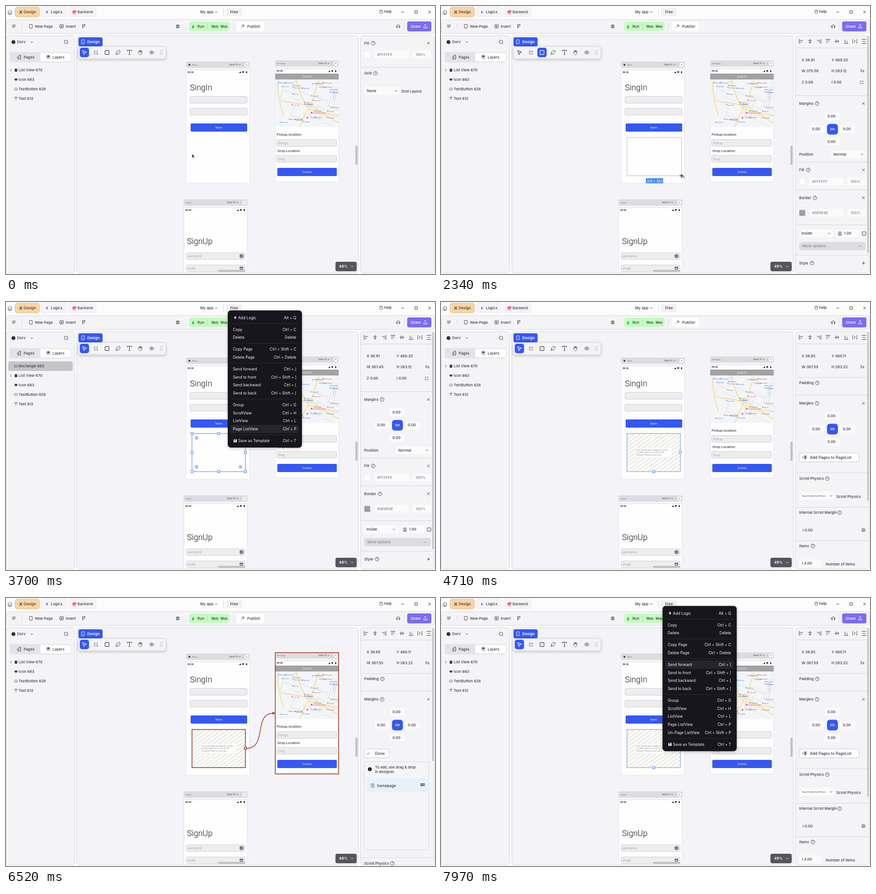
Recreate the animation shown at these times as an HTML page. Size 948 by 591 pixels, loop 8 s.

```html
<!DOCTYPE html>
<html lang="en">
<head>
<meta charset="utf-8">
<title>App builder</title>
<style>
html, body { margin: 0; width: 100%; height: 100%; overflow: hidden; background: #fcfcfd; }
svg { display: block; width: 100%; height: 100%; font: 500 8.2px Inter, sans-serif; }
</style>
</head>
<body>
<svg viewBox="0 0 948 591">
  <defs>
    <pattern id="hatch" width="9" height="7" patternUnits="userSpaceOnUse" patternTransform="rotate(-35)">
      <path d="M0 1H9" stroke="#c9c2ae" stroke-width=".9"/>
    </pattern>
    <clipPath id="map"><rect x="595" y="162" width="140" height="105"/></clipPath>
    <clipPath id="stage"><rect x="157" y="66" width="621" height="522"/></clipPath>
    <clipPath id="phone"><rect x="398" y="141" width="140" height="250"/></clipPath>
    <filter id="shadow" x="-20%" y="-20%" width="140%" height="150%">
      <feDropShadow dx="0" dy="2" stdDeviation="3" flood-opacity=".22"/>
    </filter>
  </defs>
  <g id="base"></g>
  <g id="live"></g>
</svg>
<script>
const LOOP = 8000;
const INK = '#3b3b42', GREY = '#85858c', BLUE = '#3558f4', RED = '#9b2a12', LINE = '#d6d6dd', PANEL = '#f4f4f7';
const ROBOTO = 'font-family="Roboto, sans-serif" font-weight="400"';
const LIGHT = 'font-family="Roboto, sans-serif" font-weight="300"';
const MID = 'text-anchor="middle"', END = 'text-anchor="end"';

// Drawing helpers; text is centred vertically on y
const text = (x, y, s, size = 8.2, fill = INK, more = '') =>
  `<text x="${x}" y="${y + size * .36}" font-size="${size}" fill="${fill}" ${more}>${s}</text>`;
const box = (x, y, w, h, r = 0, fill = '#fff', stroke = 'none', more = '') =>
  `<rect x="${x}" y="${y}" width="${w}" height="${h}" rx="${r}" fill="${fill}" stroke="${stroke}" ${more}/>`;
const line = (d, stroke = INK, width = 1, more = '') =>
  `<path d="${d}" fill="none" stroke="${stroke}" stroke-width="${width}" ${more}/>`;
const shape = (d, fill = INK) => `<path d="${d}" fill="${fill}"/>`;
const dot = (x, y, r, fill, stroke = 'none', more = '') =>
  `<circle cx="${x}" cy="${y}" r="${r}" fill="${fill}" stroke="${stroke}" ${more}/>`;
const at = (x, y, s) => `<g transform="translate(${x} ${y})">${s}</g>`;
const chevron = (x, y, color = INK) => line(`M${x - 2.5} ${y - 1.2}l2.5 2.5 2.5-2.5`, color);
const cross = (x, y, r = 2.7) => line(`M${x - r} ${y - r}l${2 * r} ${2 * r}m0 ${-2 * r}l${-2 * r} ${2 * r}`);
const help = (x, y) => dot(x, y, 4.2, 'none', INK, 'stroke-width=".9"') + text(x, y, '?', 6.5, INK, MID);
const bolt = (x, y, fill) => at(x, y, shape('M1-4.5L-3 .7H-.3L-1 4.5 3-1H.3Z', fill));

function random(seed) {
  return () => (seed = (seed * 16807) % 2147483647) / 2147483647;
}

function topBars() {
  const tab = (x, w, label, tx, fill = PANEL, edge = '#ededf1') => box(x, 2.5, w, 21.5, 5, fill, edge) + text(tx, 13.5, label);
  return line('M4 13.5L8.5 9l4.5 4.5M5 12.5V18h7v-5.5M8.5 18v-3.5') +
    tab(20, 54, 'Design', 39, '#f8d5a2', '#e5bd84') + line('M29.5 10.5l6 6m0-6l-6 6', '#5c4526', 1.6) +
    tab(78, 56, 'Logics', 99) + bolt(90.5, 13.5, '#7857f5') +
    tab(138, 61, 'Backend', 158) + dot(149, 13, 2.6, '#f05d9a') + dot(152.5, 12, 3, '#f05d9a') + line('M148 17h6', '#e05292', 1.5) +
    text(429, 13.5, 'My app') + chevron(464.5, 13.5) + line('M480.5 6v16', LINE) +
    box(486, 5, 35, 17, 4, '#f1f1f4') + text(504, 13.5, 'Free', 8.2, INK, MID) +
    dot(829, 12.5, 3.6, 'none', INK, 'stroke-width=".9"') + text(829, 12.5, '?', 5.5, INK, MID) + text(835.5, 12.5, 'help') +
    line('M873.5 13.5h6M903.5 10.5h5.5v5.5h-5.5z') + cross(936, 13.5) +
    box(.5, 30, 947, 30.5, 6, PANEL, LINE) +
    line('M13.5 42h8M13.5 44.5h8M13.5 47h6', INK, .9) + line('M35.5 38v14', LINE) +
    box(52, 40.5, 6, 8.5, 1, 'none', INK) + text(64, 45, 'New Page') +
    box(119, 41, 7.5, 7.5, 1, 'none', INK) + line('M120.5 44.8h4.5M122.8 42.5v4.5') + text(132, 45, 'Insert') +
    line('M169.5 40.5h5v3h-5zM169.5 43.5v5.5M169.5 46.5h3.5') +
    dot(379.5, 45, 3, 'none', INK) + line('M375.5 42h8M375.5 45h8M375.5 48h8M379.5 41v8', INK, .7) +
    box(405, 35, 89, 20, 5, '#c3fbc0') + '<ellipse cx="413.5" cy="46" rx="2" ry="3.5" fill="#32bd52"/>' +
    text(423, 45, 'Run') + line('M445.5 38v14', '#a1d7a0', .8) + text(454, 45, 'Web', 7, INK, 'font-weight="600"') + text(474, 45, 'Web', 7, INK, 'font-weight="600"') +
    line('M502.5 37v16', LINE) + box(510, 35, 60, 20, 4, '#fff') + line('M520 47.5l5-5M521 42h4.5v4.5') + text(533, 45, 'Publish') +
    line('M863 46a3.8 3.8 0 1 1 7.5 0M863 45v2.5h2V45zM870.5 45v2.5h-2V45z') + line('M880 37v16', LINE) +
    box(886.5, 34, 53.5, 22, 4, '#7b6bf6') + text(894, 45, 'Share', 8.2, '#fff') + line('M923 45v3.5h7V45M926.5 47v-7M924.5 42l2-2 2 2', '#fff');
}

function statusBar(x, y, time) {
  return text(x + 3, y, time, 4.6, '#222', 'font-weight="700"') +
    shape(`M${x + 117} ${y + 2}h4v-4z`, '#111') + shape(`M${x + 123.5} ${y - 1}q2.5-2 5 0l-2.5 3z`, '#111') + box(x + 132.5, y - 2, 2.2, 4.2, .4, '#111');
}

function page(x, barY, name, pageH, time) {
  const top = barY + 18;
  return box(x, barY, 140, 12.5, 2, '#dddde1', '#cfcfd5', 'stroke-width=".6"') +
    text(name === 'SignIn' ? x + 13 : x + 4, barY + 6.2, name, 4, '#666', ROBOTO) +
    (name === 'SignIn' ? shape(`M${x + 5} ${barY + 6.5}l2.3-2.3 2.3 2.3h-.8v2h-3v-2z`, '#222') : '') +
    text(x + 95, barY + 6.2, 'Vantel 14', 4.2, '#555') + chevron(x + 118, barY + 6.2, '#666') +
    text(x + 125.5, barY + 6, '⋮', 6, '#444', MID) + box(x + 130, barY + 2.5, 8, 8, 1, '#f7f7f9') + text(x + 134, barY + 6, '+', 5, '#333', MID) +
    box(x, top, 140, pageH, 1, '#fefefe', '#dedee3', 'stroke-width=".8"') + statusBar(x, top + 5, time);
}

const field = (x, y, w, label = '') => box(x, y, w, 15, 2.5, '#ededf0', '#c5c5ca', 'stroke-width=".8"') + text(x + 3.5, y + 7.5, label, 7, '#85858a', LIGHT);
const button = (x, y, w, label) => box(x, y, w, 18, 2, BLUE) + text(x + w / 2, y + 9, label, 5, '#fff', MID + ' ' + ROBOTO);

function map() {
  const next = random(71);
  let streets = '', pins = '';
  for (let i = 0; i < 34; i++) {
    const x = 595 + next() * 140, y = 162 + next() * 105, turn = next() < .5;
    streets += turn ? `M${x} ${y}l26 ${7 + next() * 5}` : `M${x} ${y}l${5 + next() * 6} -26`;
  }
  const labels = ['Park hall', 'Corner cafe', 'Old market', 'City garden', 'Town museum', 'Book house'];
  for (let i = 0; i < 30; i++) {
    const x = 601 + next() * 122, y = 167 + next() * 95, tone = i % 9 === 4 ? '#e5385b' : i % 4 ? '#4478dc' : '#77808e';
    pins += dot(x, y, 1.1, tone) + text(x + 2, y + 1, labels[i % 6], 2.8, tone, ROBOTO);
  }
  const roads = 'M600 167C601 190 603 205 606 216L613 242M607 209L650 216 676 222 735 258M640 163L655 205 668 228M692 163L676 212 655 250 650 267M668 228L735 243';
  return box(595, 162, 140, 105, 0, '#f4f5f7') + '<g clip-path="url(#map)">' +
    line(streets, '#dde1e7', 1.2) +
    line(roads, '#f0d98d', 2.4, 'stroke-linejoin="round"') + line(roads, '#fae9ae', 1.4, 'stroke-linejoin="round"') + pins +
    text(624, 249.5, 'Central crossing hall', 3.5, '#e13a52', ROBOTO) + dot(666, 246.5, 1.8, '#e13a52') +
    text(679, 236, 'North gate garden', 3.5, '#e13a52', ROBOTO) + dot(675.5, 235.5, 1.8, '#e13a52') + '</g>';
}

function workspace() {
  return box(156.5, 65.5, 622, 523, 6, '#f4f4f8', LINE) + '<g clip-path="url(#stage)">' +
    page(398, 123, 'SignIn', 250, '09:36') + text(406.5, 180, 'SingIn', 18, '#151515', LIGHT) +
    field(406.5, 199.5, 126.5) + field(406.5, 225.5, 126.5) + button(408, 259, 125, 'Button') +
    page(595, 120.5, 'homepage', 249.5, '09:36') + box(595, 149, 140, 13, 0, '#a2a2a3') + text(665, 155.5, 'Search', 7, '#fff', MID + ' ' + LIGHT) + map() +
    text(598, 283.5, 'Pickup location', 8, '#222', ROBOTO) + field(598, 294.5, 132.5, 'Pickup') +
    text(600, 319.5, 'Drop Location', 8, '#222', ROBOTO) + field(598, 329.5, 132.5, 'Drop') + button(599.5, 357, 131.5, 'Continue') +
    page(393, 427, 'signup', 160, '09:36') + text(400, 518.5, 'SignUp', 18, '#151515', LIGHT) +
    field(398, 544, 130, 'username') + dot(520.5, 551.5, 3.5, 'none', '#222', 'stroke-width="1.2"') + line('M517.5 550l6 3M519 554l2-5', '#222') +
    field(398, 571, 130, 'email') + box(517, 575.5, 6.5, 5, .7, 'none', '#222') + line('M517 576l3.2 2.3 3.3-2.3', '#222') + '</g>' +
    box(469, 582, 60, 4.5, 1, '#c0c0c5') + box(772, 308, 5, 42, 2, '#c2c2c8') +
    box(728, 564, 47, 21, 4, '#55565b') + text(736, 574.5, '49%', 8.2, '#fff', 'font-weight="600"') + chevron(765, 574.5, '#fff') +
    box(160, 69, 53.5, 20, 4, BLUE) + box(167, 74.5, 6, 8.5, 1, 'none', '#fff') + text(179.5, 79, 'Design', 8.2, '#fff', 'font-weight="600"') +
    box(160, 89.5, 193, 26.5, 5, '#f4f4f7', '#d9d9df', 'filter="url(#shadow)"');
}

function leftPanel() {
  return box(.5, 65.5, 151, 523, 6, PANEL, LINE) + dot(16.5, 79.5, 4.3, '#333338') + text(24.5, 79.5, 'Dorv') + chevron(57, 79.5) +
    dot(132.5, 79, 3.8, 'none', INK) + line('M135.3 81.8l2 2') +
    box(8, 101.5, 136, 23, 5, '#e4e4e8') + box(76, 103.5, 67, 19, 4, '#fff') +
    line('M27 108.5h5.5v8.5H26v-4M24.5 112.5h5M28 111l1.5 1.5-1.5 1.5') + text(39, 113, 'Pages') +
    shape('M93.5 108.5l4.5 2.3-4.5 2.3-4.5-2.3z') + line('M89 113.5l4.5 2.3 4.5-2.3') + text(103, 113, 'Layers');
}

function layers(withRectangle) {
  const shift = withRectangle ? 20.9 : 0, y = i => 141.5 + shift + i * 20.9;
  const outline = yy => box(19, yy - 2.2, 6, 4.4, .8, 'none', INK, 'stroke-width=".8"');
  return (withRectangle ? box(5, 131, 142.5, 21, 4, '#c4c4c9') + outline(141.5) + text(28, 141.5, 'Rectangle 682') : '') +
    line(`M9.5 ${y(0) - 2.5}l2.5 2.5-2.5 2.5`) + box(19.5, y(0) - 3.5, 5, 7, 1, INK) + line(`M18.5 ${y(0) - 1}h7m0 2.5h-7`, INK, .7) + text(28, y(0), 'List View 670') +
    shape(`M22 ${y(1) + 3.2}l-3-3c-1.5-3 2-4 3-1.7 1-2.3 4.5-1.3 3 1.7z`) + text(28, y(1), 'Icon 663') +
    outline(y(2)) + text(28, y(2), 'TextButton 628') + line(`M19 ${y(3) - 1.5}v-1.5h6v1.5M22 ${y(3) - 3}v6`, INK, .9) + text(28, y(3), 'Text 612');
}

function tools(active) {
  const x = active === 'rect' ? 213 : 163, tint = name => active === name ? '#fff' : INK;
  return box(x, 92, 20.5, 21, 5, BLUE) +
    line('M169.5 98.5l3 8.5 1.5-3.8 3.8-1.5z', tint('select'), 1.1) +
    line('M196 98v9.5M201.5 98v9.5M194 100h9.5M194 105.5h9.5', GREY, .9) +
    box(218.8, 98.3, 8.8, 8.5, 1, 'none', tint('rect'), 'stroke-width="1.2"') +
    line('M243 107l1-6 4-3 4 4-3 4zM243 107l4-4M248.5 98l1.5-1 3 3-1 1.5', INK, .8) +
    line('M268 100v-2.5h9.5V100M272.7 97.5v9.5M271 107h3.5', INK, 1.1) +
    line('M294 103v-4q1-1 1.5 0v3-4q1-1 1.7 0v4-3.5q1-1 1.7 0v4-3q1-1 1.6 0v4.5q-1 4-4 3.8-2 0-5-5 1-1.5 2.5.2', INK, .7) +
    line('M316.5 102.5q5.5-7 11 0q-5.5 7-11 0z', INK, .9) + dot(322, 102.5, 1.7, 'none', INK) +
    [98.5, 102.5, 106.5].map(y => dot(341.5, y, .8, GREY) + dot(345, y, .8, GREY)).join('');
}

const rule = y => line(`M784 ${y + .5}H946`, LINE);
const head = (y, label, helpX, close = true) => text(791.5, y, label) + help(helpX, y) + (close ? cross(933.5, y) : '');
const value = (x, y, w, label, tx = x + 6, fill = INK) => box(x, y - 8.5, w, 17, 3, '#fbfbfc') + text(tx, y, label, 8.2, fill);
const colorRow = (y, color, code) => box(791.5, y - 6.5, 13.5, 13.5, 2, color, '#e3e3e8', 'stroke-width=".6"') +
  value(814, y, 76, code, 820, GREY) + value(898, y, 41, '100%', 905, GREY);
const scrollbar = bottom => box(942, 66, 3.2, bottom - 66, 1.5, '#c3c3c8');

function metrics(x, y, w, h) {
  const align = at(796, 78, line('M-4.5-5v10M-3-2h7M-3 2h4')) + at(815.5, 78, line('M0-5v10M-4-2h8M-3 2h6')) + at(835, 78, line('M4.5-5v10M3-2h-7M3 2h-4')) +
    at(855, 78, line('M-5-4.5h10M-2-3v7M2-3v4')) + at(875, 78, line('M-5 0h10M-2-4v8M2-3v6')) + at(895, 78, line('M-5 4.5h10M-2 3v-7M2 3v-4')) +
    at(914.5, 78, line('M-4.5-5v10M4.5-5v10M0-3v6')) + at(934.5, 78, line('M-5-4.5h10M-5 4.5h10M-3 0h6'));
  return align + rule(92) + text(797, 119, 'X ' + x) + text(863, 119, 'Y ' + y) +
    text(797, 143.5, 'W ' + w) + text(863, 143.5, 'H ' + h) +
    line('M929 141.5q-3 1-1 3.5h2M933 145.5q3-1 1-3.5h-2M927 139l8 7.5');
}

function margins(y) {
  return head(y, 'Margins', 831) + value(848, y + 28, 33, '0.00', 854) + value(814, y + 56.5, 33, '0.00', 820) + value(882, y + 56.5, 33, '0.00', 888) +
    value(848, y + 84.5, 33, '0.00', 854) + box(853, y + 45, 24, 23.5, 6, BLUE) +
    at(865, y + 56.5, line('M-.5-1.7h-2a1.7 1.7 0 0 0 0 3.4h2M.5-1.7h2a1.7 1.7 0 0 1 0 3.4h-2M-1.5 0h3', '#fff', 1.1));
}

const pagePanel = () => head(82, 'Fill', 811.5) + colorRow(107, '#fff', '#FFFFFF') + rule(135) +
  head(148.5, 'Grid', 816.5, false) + box(791.5, 178, 77, 18, 3, '#fbfbfc') + text(797.5, 187, 'None') + chevron(862, 187) + text(873.5, 188.5, 'Grid Layout');

const rectPanel = (w, h) => metrics('38.91', '460.20', w, h) + text(797, 168, 'Z 0.00') + text(863, 168, 'I 0.00') +
  line('M926.5 167.5v-2h2M930.5 165.5h2v2M932.5 169.5v2h-2M928.5 171.5h-2v-2') + rule(197) + margins(215) +
  text(791.5, 327, 'Position') + value(861, 327, 78, 'Normal', 867) + chevron(930, 327) + rule(344) +
  head(361.5, 'Fill', 811.5) + colorRow(387, '#fff', '#FFFFFF') + rule(405) +
  head(423, 'Border', 826.5) + colorRow(456, '#9e9e9e', '#9E9E9E') + rule(482) +
  value(791.5, 501.5, 76, 'Inside', 796.5) + chevron(857.5, 501.5) + value(873, 501.5, 52, '1.00', 890.5) +
  line('M877.5 498.5h8M877.5 501h8M877.5 503.5h8M877.5 505.5h8', INK, 1.1) + box(931, 498, 8, 7.5, 1, 'none', INK) +
  box(791.5, 520.5, 147, 18, 4, '#dcdce1') + text(798.5, 529.5, 'More options', 8.2, GREY) + chevron(925, 529.5, GREY) + rule(549) +
  head(567, 'Style', 820, false) + line('M930.5 567h6.5M933.7 563.7v6.5') + scrollbar(545);

const listTop = () => metrics('38.85', '460.11', '367.55', '263.22') + rule(166) + head(178.5, 'Padding', 831.5, false) + rule(205) + margins(223.5);

const listPanel = () => listTop() +
  box(791.5, 333, 132.5, 19.5, 3, '#fff', '#c7c7cd') + line('M797 342.5h4M799 340.5l2 2-2 2', GREY) + box(802.5, 338.5, 5, 8, 1, '#77777e') +
  text(815, 342.8, 'Add Pages to PageList', 8.6) + rule(376) + head(389.5, 'Scroll Physics', 853.5, false) +
  box(791.5, 418.5, 77, 18, 3, '#fbfbfc') + text(797.5, 428, 'Always Scrollable Scroll Physics', 3.4) + chevron(861.5, 427.5) + text(873.5, 429.5, 'Scroll Physics') +
  rule(452) + head(464.5, 'Internal Scroll Margin', 881, false) + text(799, 503, 'I 0.00') + box(930, 499.5, 7, 7, 1.5, 'none', INK, 'stroke-dasharray="2 1"') + box(931.7, 501.2, 3.6, 3.6, .5, 'none', INK) +
  rule(526) + head(538, 'Items', 822, false) + value(791.5, 576, 49, 'I 3.00', 797.5) + text(850, 578.5, 'Number of items') + scrollbar(438);

const linkPanel = linked => listTop() + box(791.5, 333, 55, 19.5, 3, '#fff', '#c7c7cd') + line('M797.5 342.5l2.3 2.5 4.2-5', '#3fb554', 1.1) + text(815.5, 342.8, 'Done', 8.6) +
  box(791.5, 361, 142.5, 194, 3, '#f5f5f8', LINE) + dot(804, 377.5, 4.3, '#151515') + text(804, 377.5, 'i', 6, '#fff', MID) +
  text(815.5, 373, 'To add, use drag &amp; drop', 7.9) + text(815.5, 383.5, 'in designer.', 7.9) +
  (linked ? box(797, 397, 134, 32, 2, '#e9f0f8') + box(806, 408.5, 8, 10, 1.5, '#b9b9bf') + text(820, 414, 'homepage') + line('M915.5 410.3h10M915.5 413.5h10', '#111', 1.6) : '') +
  rule(572) + head(585, 'Scroll Physics', 853.5, false) + scrollbar(360);

const handle = (x, y) => box(x - 2.5, y - 2.5, 5, 5, 0, '#fff', '#4a7fe0');

function selection() {
  const handles = [[411, 290], [470, 290], [529, 290], [411, 332], [529, 332], [411, 374], [470, 374], [529, 374]];
  const radii = [[421, 300], [518, 300], [421, 363.5], [518, 363.5]];
  return box(411, 290, 118, 84, 0, '#fefefe', '#4a7fe0') + handles.map(([x, y]) => handle(x, y)).join('') +
    radii.map(([x, y]) => dot(x, y, 3.2, '#fff', '#4a7fe0') + dot(x, y, 1.3, '#4a7fe0')).join('');
}

function drawnBox(w, h, unitsW, unitsH) {
  const size = `${Math.max(0, Math.round(unitsW - 1.5))} × ${Math.round(unitsH)}`, mid = 411 + w / 2, y = 290 + h;
  return box(411, 290, w, h, 0, '#fefefe', '#9fb2d8', 'stroke-width=".9"') +
    `<g clip-path="url(#phone)">${box(mid - 18.5, y + 5.5, 38, 13, 1, '#438bf5')}${text(mid + .5, y + 11.7, size, 7, '#fff', MID)}</g>`;
}

function pageList(linking) {
  const note = ["Use 'Add Page to PageList' button", 'to add pages to this list in the', 'Property Panel on left side.'];
  return box(411, 290, 118, 84, 0, '#fdfdfd') + box(411, 290, 118, 84, 0, 'url(#hatch)', linking ? RED : '#5f8fd0', `stroke-width="${linking ? 1.5 : 1}"`) +
    box(429.5, 320.5, 81, 23, 1, '#fdfdfd', '#e6e3d8', 'stroke-width=".6"') +
    note.map((s, i) => text(432, 326 + i * 5.8, s, 4.7, '#a0a0a4', ROBOTO)).join('') +
    (linking ? box(526.5, 329, 5, 5, 1, '#fff', RED, 'stroke-width="1.5"') : handle(529, 331.5) + handle(470, 374));
}

function connector(x, y) {
  const dx = (x - 529) * .75;
  return line(`M531 331.5C${529 + dx} 331.5 ${x - dx} ${y} ${x - 4} ${y}`, RED, 1.4) + shape(`M${x} ${y}l-6-3v6z`, RED);
}

// Groups are split by separators
const MENU = [
  [['Add Logic', 'Alt + Q']],
  [['Copy', 'Ctrl + C'], ['Delete', 'Delete']],
  [['Copy Page', 'Ctrl + Shift + C'], ['Delete Page', 'Ctrl + Delete']],
  [['Send forward', 'Ctrl + ]'], ['Send to front', 'Ctrl + Shift + ]'], ['Send backward', 'Ctrl + ['], ['Send to back', 'Ctrl + Shift + [']],
  [['Group', 'Ctrl + G'], ['ScrollView', 'Ctrl + H'], ['ListView', 'Ctrl + L'], ['Page ListView', 'Ctrl + P'], ['Un-Page ListView', 'Ctrl + Shift + P']],
  [['Save as Template', 'Ctrl + T']]
];

function menu(x, top, pointerX, pointerY, canUnpage) {
  let y = top + 16, items = '';
  MENU.forEach((group, g) => {
    const first = g === 0, last = g === MENU.length - 1;
    const rows = group.filter(([name]) => canUnpage || name !== 'Un-Page ListView');
    if (!first) items += line(`M${x + 7} ${y - 13}h150`, '#34353c', .8);
    rows.forEach(([name, keys], i) => {
      if (pointerX > x + 6 && Math.abs(pointerY - y) < 8.9) items += box(x + 6, y - 9, 151, 18, 3, '#25262d');
      items += text(x + (first || last ? 23 : 11.5), y, name, 8.4, '#f4f4f6', 'font-weight="400"') + text(x + 151.5, y, keys, 8.4, '#f4f4f6', END + ' font-weight="400"');
      if (first) items += bolt(x + 16.5, y, '#fff');
      if (last) items += box(x + 13, y - 3.5, 7, 7, 1, '#fff') + box(x + 14.5, y - 3, 3.5, 2, 0, '#14151b') + dot(x + 16.5, y + 1.5, 1.1, '#14151b');
      y += i < rows.length - 1 ? 17.7 : 26;
    });
  });
  return box(x, top, 164, y - 11 - top, 7, '#13141b', 'none', 'filter="url(#shadow)"') + items;
}

// Moments of each click, in ms
const PICK_RECT = 880, PRESS = 1690, RELEASE = 2580, MENU_OPEN = 3400, MAKE_LIST = 4200,
  ADD_PAGES = 5200, PULL = 5500, DROP = 6050, DONE = 6950, MENU_AGAIN = 7500;

// [time, x, y]
const POINTER = [[0, 411, 326], [200, 411, 326], [780, 222, 103], [950, 222, 103], [1300, 411.5, 290], [PRESS, 411, 290],
  [2240, 531.5, 374.3], [2360, 531.5, 374.3], [2480, 529, 374.3], [RELEASE, 529, 374.3], [3150, 490, 321], [MENU_OPEN, 490, 321],
  [3680, 530, 280], [MAKE_LIST, 530, 280], [4950, 850, 343], [ADD_PAGES, 850, 343], [PULL, 529, 331.5], [DROP, 595, 254], [6300, 595, 254],
  [6750, 820, 343], [DONE, 820, 343], [7350, 489, 337], [MENU_AGAIN, 489, 337], [7920, 520, 147], [LOOP, 520, 147]];

function pointerAt(t) {
  const i = POINTER.findIndex(k => k[0] > t), [t0, x0, y0] = POINTER[i - 1], [t1, x1, y1] = POINTER[i];
  const u = (t - t0) / (t1 - t0), e = u * u * (3 - 2 * u);
  return [x0 + (x1 - x0) * e, y0 + (y1 - y0) * e];
}

function cursor(x, y, drawing) {
  return at(x, y, drawing
    ? line('M-5 0H5M0-5V5', '#fff', 3) + line('M-4.5 0h9M0-4.5v9', '#333', 1.7) + box(2, 1.5, 4, 3, 0, '#fff', '#555', 'stroke-width=".8"')
    : '<path d="M0 0V9L2.2 7 3.7 10 5.1 9.3 3.7 6.5H6.5Z" fill="#333" stroke="#eee" stroke-width=".7"/>');
}

function scene(t) {
  const [x, y] = pointerAt(t), within = (a, b) => t >= a && t < b;
  const rectTool = within(PICK_RECT, RELEASE), drawing = within(PRESS, RELEASE), selected = within(RELEASE, MAKE_LIST);
  const linking = within(ADD_PAGES, DONE), linked = within(DROP, DONE);
  const w = Math.max(0, x - 411), h = Math.max(0, y - 290), unitsW = w * 3.1167, unitsH = h * 3.1212;
  let out = layers(selected) + tools(rectTool ? 'rect' : 'select') + box(783.5, 65.5, 163, 523, 6, PANEL, LINE);

  if (t < PRESS) out += pagePanel();
  else if (drawing) out += rectPanel(unitsW.toFixed(2), unitsH.toFixed(2)) + drawnBox(w, h, unitsW, unitsH);
  else if (selected) out += rectPanel('367.45', '263.12') + selection();
  else out += (linking ? linkPanel(linked) : listPanel()) + pageList(linking);

  if (within(PULL, DROP)) out += connector(x, y);
  if (linked) out += connector(595, 254) + box(595, 120.5, 140, 267.5, 0, 'none', RED, 'stroke-width="1.5"');
  if (within(MENU_OPEN, MAKE_LIST)) out += menu(490, 18.5, x, y, false);
  if (t >= MENU_AGAIN) out += menu(489.5, 17.5, x, y, true);
  if (t < MENU_OPEN || within(ADD_PAGES, 6300) || within(DONE, MENU_AGAIN)) out += cursor(x, y, rectTool && y > 118);
  return out;
}

const live = document.getElementById('live');
document.getElementById('base').innerHTML = topBars() + leftPanel() + workspace();
let shown = '';
function tick() {
  const next = scene(performance.now() % LOOP);
  if (next !== shown) live.innerHTML = shown = next;
  requestAnimationFrame(tick);
}
tick();
</script>
</body>
</html>
```
